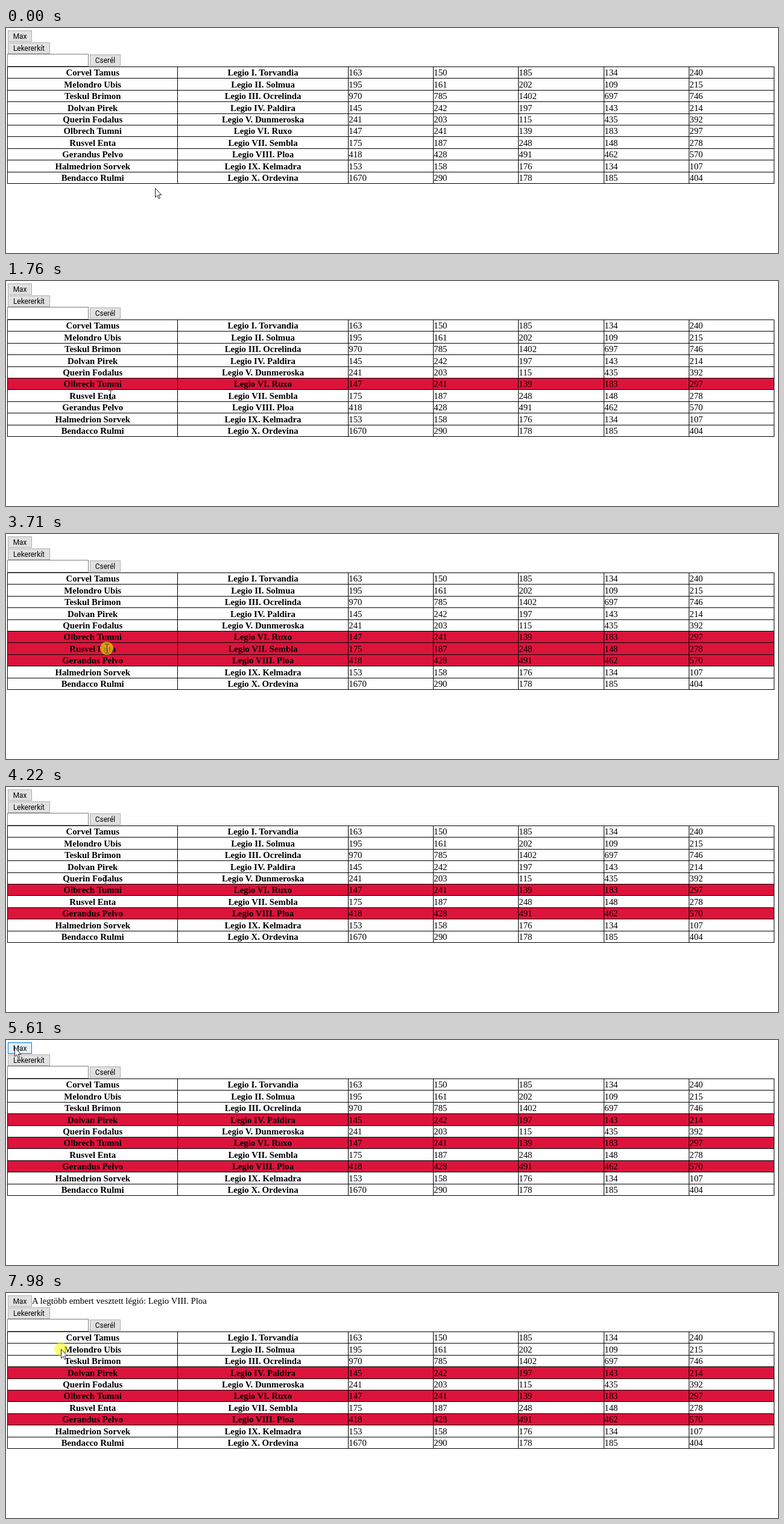
An HTML page that plays this animation: 1280x374 px, repeating every 8000 ms.

```html
<!DOCTYPE html>
<html lang="hu">
<head>
<meta charset="utf-8">
<title>Légiók</title>
<style>
  html, body { margin: 0; width: 100%; height: 100%; overflow: hidden; background: #fff; }
  svg { display: block; width: 1280px; height: 374px; font: 14.8px "Liberation Serif", serif; }
  .head { font-weight: bold; text-anchor: middle; }
  .label { font: 11.9px Roboto, sans-serif; text-anchor: middle; }
  rect { shape-rendering: crispEdges; }
  .button { fill: #e1e1e1; stroke: #adadad; }
  .button.focus { stroke: #0078d7; }
  .button.hover { fill: #e5f1fb; stroke: #0078d7; }
  .button.pressed { fill: #cce4f7; stroke: #005499; }
  .field { fill: #fff; stroke: #7a7a7a; }
  .field.hover { stroke: #333; }
  .row { fill: #dc143c; }
</style>
</head>
<body>
<svg id="stage" viewBox="0 0 1280 374">
  <g id="controls"></g>
  <text id="result" x="43" y="18">A legtöbb embert vesztett légió: Legio VIII. Ploa</text>
  <g id="table"></g>
  <circle id="click" r="11" fill="#ff0" fill-opacity=".55"/>
  <g id="pointer">
    <path id="arrow" d="M0 0V15L3.4 11.8L5.7 17.2L8 16.2L5.7 10.9H10.3Z" fill="#fff" stroke="#1c1c38"/>
    <path id="beam" d="M-3.5 -7.5H-1Q0 -7.5 0 -6.5Q0 -7.5 1 -7.5H3.5M0 -6.5V6.5M-3.5 7.5H-1Q0 7.5 0 6.5Q0 7.5 1 7.5H3.5" fill="none" stroke="#383838"/>
  </g>
</svg>
<script>
const LOOP = 8000, TOP = 64, PITCH = 19.4;
const COLUMNS = [2, 284, 567, 708, 849, 991, 1132, 1273];
const legions = [
  ['Corvel Tamus', 'I. Torvandia', '163 150 185 134 240'],
  ['Melondro Ubis', 'II. Solmua', '195 161 202 109 215'],
  ['Teskul Brimon', 'III. Ocrelinda', '970 785 1402 697 746'],
  ['Dolvan Pirek', 'IV. Paldira', '145 242 197 143 214'],
  ['Querin Fodalus', 'V. Dunmeroska', '241 203 115 435 392'],
  ['Olbrech Tumni', 'VI. Ruxo', '147 241 139 183 297'],
  ['Rusvel Enta', 'VII. Sembla', '175 187 248 148 278'],
  ['Gerandus Pelvo', 'VIII. Ploa', '418 428 491 462 570'],
  ['Halmedrion Sorvek', 'IX. Kelmadra', '153 158 176 134 107'],
  ['Bendacco Rulmi', 'X. Ordevina', '1670 290 178 185 404']
];

// start, end, target x, target y
const moves = [
  [0, 0, 247, 266],
  [50, 840, 169, 171],
  [1430, 1760, 173, 189],
  [2330, 2460, 168, 199],
  [2490, 2750, 171, 208],
  [3150, 3250, 167, 190],
  [4030, 4330, 162, 138],
  [4870, 5430, 20, 34],
  [5480, 5610, 14, 12],
  [7140, 7780, 91, 93]
];
const clicks = [[1020, 1120], [2000, 2100], [2990, 3090], [3710, 3840], [4640, 4760], [5840, 5970], [7980, LOOP]];
// row, marked from, marked until
const marks = [[5, 1150, LOOP], [6, 2130, 3860], [7, 3120, LOOP], [3, 4790, LOOP]];

const $ = id => document.getElementById(id);
const within = (t, from, to) => t >= from && t < to;
const show = (node, on) => node.setAttribute('visibility', on ? 'visible' : 'hidden');
const lineY = i => Math.round(TOP + PITCH * i);

function add(parent, tag, attrs, text = '') {
  const node = document.createElementNS('http://www.w3.org/2000/svg', tag);
  for (const key in attrs) node.setAttribute(key, attrs[key]);
  node.textContent = text;
  return parent.appendChild(node);
}

function addBox(type, x, y, width, height, label) {
  const node = add($('controls'), 'rect', { class: type, x: x + .5, y: y + .5, width, height });
  if (label) add($('controls'), 'text', { class: 'label', x: x + width / 2 + .5, y: y + 14 }, label);
  return { node, hit: (px, py) => px >= x && px <= x + width && py >= y && py <= y + height };
}

const maxButton = addBox('button', 3, 4, 39, 18, 'Max');
const colorButton = addBox('button', 3, 24, 69, 18, 'Lekererkít');
const field = addBox('field', 2, 43, 134, 20);
addBox('button', 139, 44, 50, 18, 'Cserél');

const table = $('table');
const rows = legions.map((_, i) => add(table, 'rect',
  { class: 'row', x: 2, y: lineY(i), width: 1271, height: lineY(i + 1) - lineY(i) }));
for (let i = 0; i <= legions.length; i++) add(table, 'rect', { x: 2, y: lineY(i), width: 1272, height: 1 });
for (const x of COLUMNS) add(table, 'rect', { x, y: TOP, width: 1, height: lineY(legions.length) - TOP + 1 });

const names = legions.map(([name, legion, counts], i) => {
  const y = Math.round(79.4 + PITCH * i);
  add(table, 'text', { class: 'head', x: 426, y }, 'Legio ' + legion);
  counts.split(' ').forEach((count, c) => add(table, 'text', { x: COLUMNS[c + 2] + 1.3, y }, count));
  return add(table, 'text', { class: 'head', x: 143.7, y }, name);
});

function pointerAt(t) {
  let [, , x, y] = moves[0];
  for (const [from, to, nextX, nextY] of moves.slice(1)) {
    if (t <= from) break;
    const p = Math.min(1, (t - from) / (to - from));
    const eased = p * p * (3 - 2 * p);
    x += (nextX - x) * eased;
    y += (nextY - y) * eased;
  }
  return [x, y];
}

function overText(x, y) {
  const name = names[Math.floor((y - TOP) / PITCH)];
  return field.hit(x, y) || !!name && Math.abs(x - 143.7) < name.getComputedTextLength() / 2;
}

function draw(t) {
  const [x, y] = pointerAt(t);
  const isText = overText(x, y);
  $('pointer').setAttribute('transform', `translate(${Math.round(x) + .5} ${Math.round(y) + .5})`);
  show($('beam'), isText);
  show($('arrow'), !isText);

  $('click').setAttribute('cx', x);
  $('click').setAttribute('cy', y);
  show($('click'), clicks.some(([on, off]) => within(t, on, off)));

  rows.forEach((row, i) => show(row, marks.some(([r, from, to]) => r === i && within(t, from, to))));
  show($('result'), t >= 5990);

  for (const box of [maxButton, colorButton, field]) box.node.classList.toggle('hover', box.hit(x, y));
  maxButton.node.classList.toggle('pressed', within(t, 5840, 5970));
  maxButton.node.classList.toggle('focus', within(t, 5840, 7980));
}

const start = performance.now();
function tick() {
  draw((performance.now() - start) % LOOP);
  requestAnimationFrame(tick);
}
tick();
</script>
</body>
</html>
```
